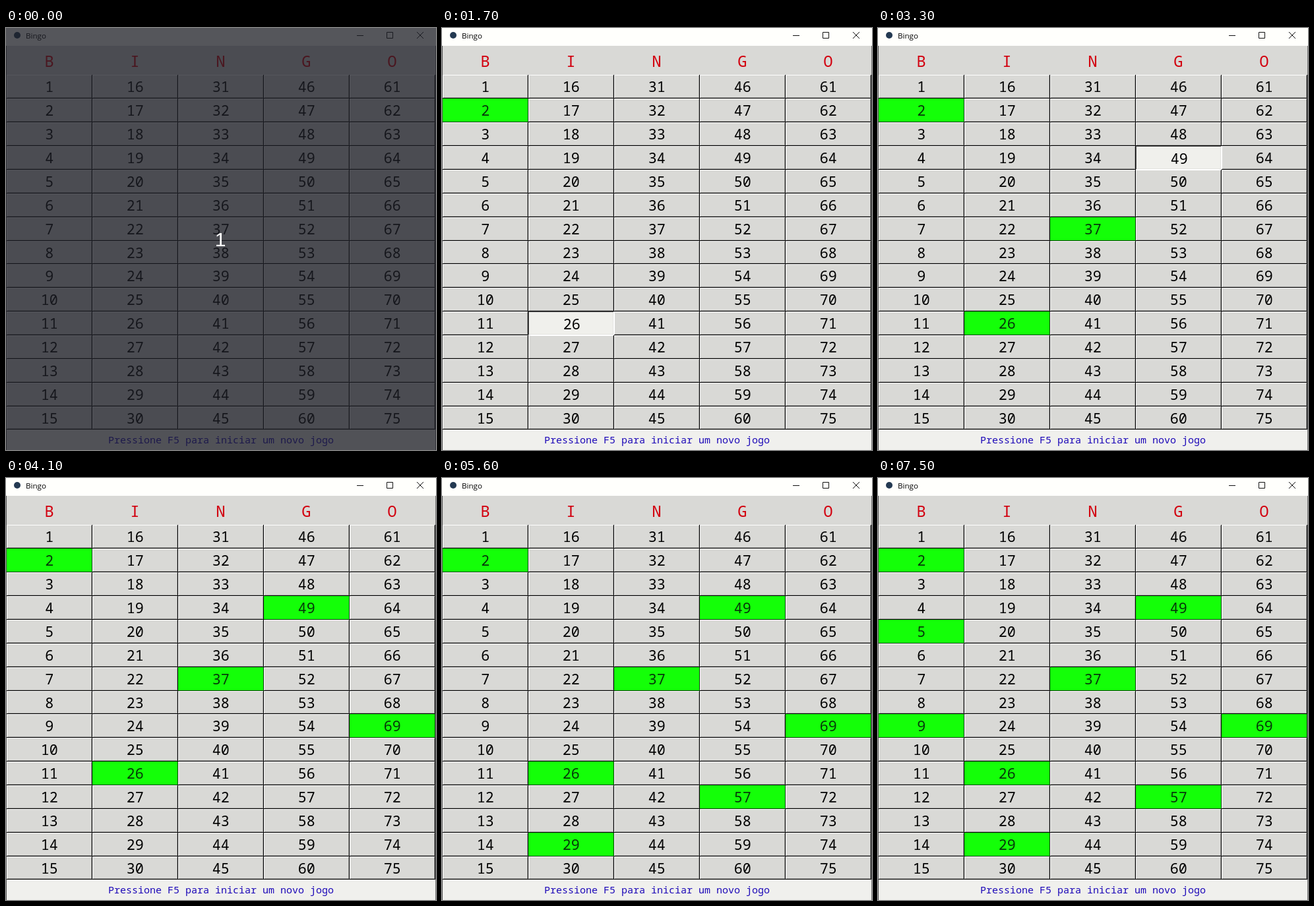
An HTML page that plays this animation: 652 by 640 pixels, repeating every 8000 ms.

```html
<!DOCTYPE html>
<html lang="pt">
<head>
<meta charset="utf-8">
<title>Bingo</title>
<style>
  html, body { margin: 0; width: 100%; height: 100%; overflow: hidden; background: #fffffc; }
  svg { display: block; }
  text { text-anchor: middle; font-family: "Noto Sans Mono", "DejaVu Sans Mono", monospace; }
  .num { font-size: 21.7px; fill: #000; }
  .head { font-size: 24px; font-weight: 500; fill: #d2000f; }
  .foot { font-size: 15px; fill: #1c08b8; }
  .title { font: 11.6px "Open Sans", "Noto Sans", sans-serif; text-anchor: start; }
  .count { font: 30px "Liberation Sans", Arial, sans-serif; fill: #fff; }
  .face { fill: #d9d9d6; }
  .light { fill: #fff; }
  .shade { fill: #a2a2a0; }
  .dark { fill: #000; }
  .down .face { fill: #f0f0ec; }
  .down .light { fill: #696969; }
  .down .dark { fill: #fff; }
  .down .shade { fill: #e3e3e0; }
  .down .num { transform: translate(1px, 1px); }
  .drawn .face, .drawn .light, .drawn .shade { fill: #14ff08; }
  .drawn .dark { fill: #063a04; }
  .drawn .num { fill: #06380a; }
</style>
</head>
<body>
<svg id="stage" width="652" height="640" viewBox="0 0 652 640"></svg>
<script>
const LOOP = 8000;
const stage = document.getElementById('stage');

// number, time pressed, time marked
const draws = [
  [2, 800, 800], [26, 1700, 1800], [37, 2400, 2600], [49, 3300, 3400],
  [69, 4000, 4100], [57, 4700, 4800], [29, 5500, 5600], [9, 6300, 6400],
  [5, 7400, 7500]
];

function add(parent, tag, attrs, text) {
  const el = document.createElementNS('http://www.w3.org/2000/svg', tag);
  for (const key in attrs) el.setAttribute(key, attrs[key]);
  if (text !== undefined) el.textContent = text;
  parent.append(el);
  return el;
}

function rect(parent, x, y, width, height, attrs) {
  return add(parent, 'rect', { x, y, width, height, ...attrs });
}

function label(parent, x, y, cls, text) {
  return add(parent, 'text', { x, y, class: cls }, text);
}

const rowTop = i => 71 + 36 * i - (i >= 8 ? 1 : 0);

function makeCell(n) {
  const col = Math.floor((n - 1) / 15), row = (n - 1) % 15;
  const x = 1 + 130 * col, y = rowTop(row), w = 130;
  const h = row === 14 ? 35 : rowTop(row + 1) - y;
  const g = add(stage, 'g', {});
  const part = (dx, dy, pw, ph, cls) => rect(g, x + dx, y + dy, pw, ph, { class: cls });
  part(0, 0, w, h, 'face');
  part(0, 0, w, 1, 'light');
  part(0, 0, 1, h, 'light');
  part(1, h - 2, w - 2, 1, 'shade');
  part(w - 2, 1, 1, h - 2, 'shade');
  part(0, h - 1, w, 1, 'dark');
  part(w - 1, 0, 1, h, 'dark');
  label(g, x + 64.7, y + 26, 'num', n);
  return g;
}

// window and title bar
rect(stage, 0, 0, 652, 640, { fill: '#fffffc' });
add(stage, 'circle', { cx: 17, cy: 11, r: 5, fill: '#243a52' });
label(stage, 30, 16, 'title', 'Bingo');
add(stage, 'path', {
  d: 'M532 11.5h10M577.5 6.5h9v9h-9zM623 6l10 10M633 6l-10 10',
  fill: 'none', stroke: '#111', 'stroke-width': 1
});

// header, board and footer
rect(stage, 0, 27, 652, 44, { fill: '#d9d9d6' });
[...'BINGO'].forEach((c, i) => label(stage, 65.5 + 130 * i, 58.5, 'head', c));
rect(stage, 0, 609, 652, 31, { fill: '#f0f0ed' });
label(stage, 326, 630, 'foot', 'Pressione F5 para iniciar um novo jogo');
rect(stage, 0, 27, 1, 613, { fill: '#555' });
rect(stage, 651, 27, 1, 613, { fill: '#777' });

const cells = {};
for (let n = 1; n <= 75; n++) cells[n] = makeCell(n);

// dimmed countdown
const veil = add(stage, 'g', {});
rect(veil, 0, 0, 652, 640, { fill: 'rgb(28,30,38)', 'fill-opacity': 0.75 });
label(veil, 325, 331, 'count', '1');

function render(t) {
  veil.setAttribute('visibility', t < 100 ? 'visible' : 'hidden');
  for (const [n, press, mark] of draws) {
    cells[n].setAttribute('class', t >= mark ? 'drawn' : t >= press ? 'down' : '');
  }
}

const start = performance.now();
function tick() {
  render((performance.now() - start) % LOOP);
  requestAnimationFrame(tick);
}
tick();
</script>
</body>
</html>
```
